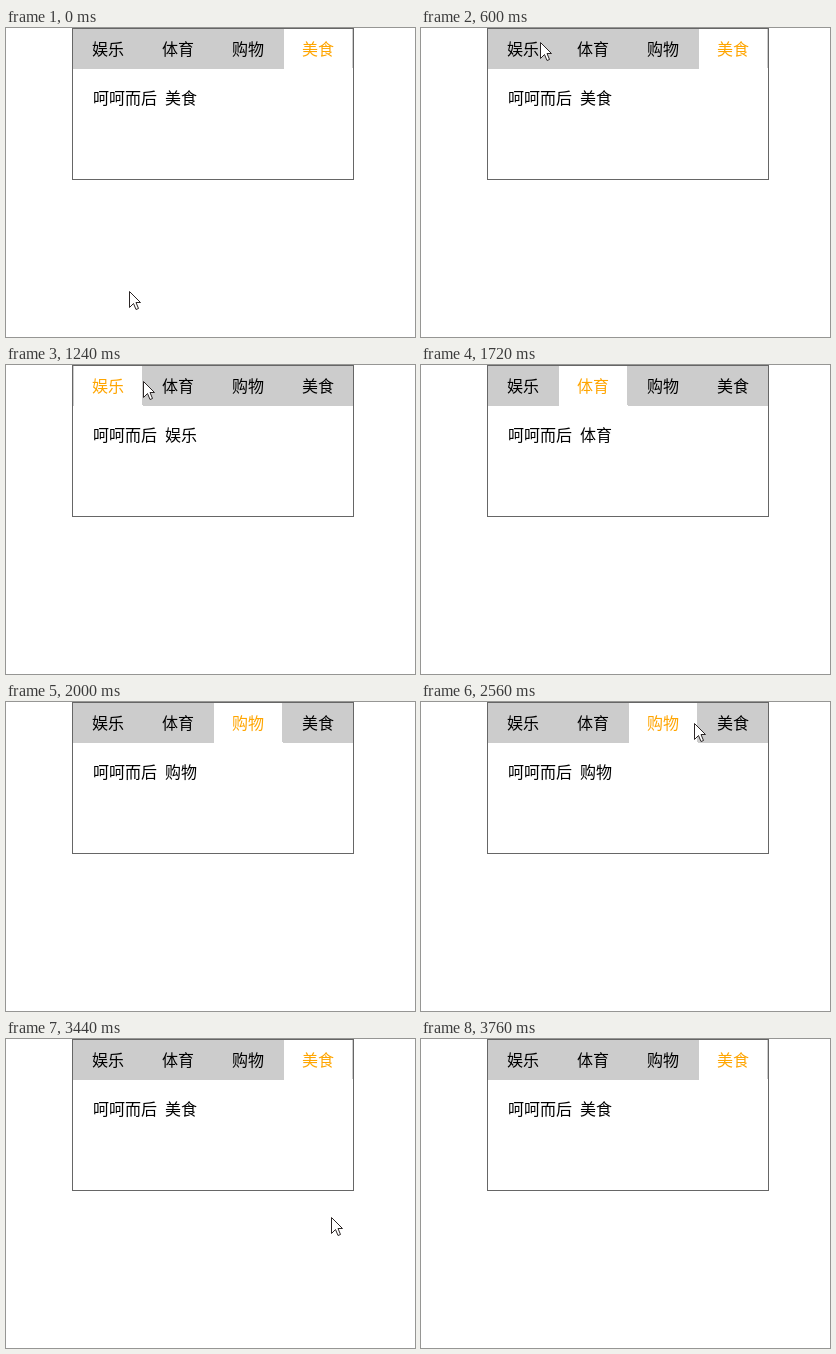
These frames come from a looping animation (409 px wide and 309 px high, 4720 ms). An HTML page with a canvas:

```html
<!DOCTYPE html>
<html lang="zh-CN">
<head>
<meta charset="utf-8">
<title>Tabs</title>
<style>
html, body { margin: 0; width: 100%; height: 100%; overflow: hidden; background: #fff; }
canvas { display: block; width: 100vw; height: 100vh; }
</style>
</head>
<body>
<canvas id="stage" width="409" height="309"></canvas>
<script>
const ctx = document.getElementById('stage').getContext('2d');
const LOOP = 4720, STEP = 40, EXIT = 3760;
const LABELS = ['娱乐', '体育', '购物', '美食'];
const FONT = '16px "Noto Sans CJK SC", "Noto Sans CJK", sans-serif';
const LEFT = 67, TAB = 70, BAR = 40, PAD = 19, LABEL_WIDTH = 32;

const START = { x: 123, y: 263 };
const MOVES = [
  { from: 360, to: 600, x: 119, y: 14 },
  { from: 600, to: 920, x: 98, y: 21 },
  { from: 1000, to: 1240, x: 137, y: 16 },
  { from: 1240, to: 1440, x: 172, y: 20 },
  { from: 1680, to: 2000, x: 240, y: 21 },
  { from: 2440, to: 2720, x: 318, y: 22 },
  { from: 3160, to: 3640, x: 330, y: 290 },
  { from: 3640, to: EXIT, x: 330, y: 309 }
];
const ARROW = new Path2D('M.5 .5V16.5L4.5 12.5L7 18.5L9.5 17.5L7 11.5H11.5Z');

function pointerAt(t) {
  let { x, y } = START;
  for (const m of MOVES) {
    const k = Math.min(1, Math.max(0, (t - m.from) / (m.to - m.from)));
    x += (m.x - x) * k;
    y += (m.y - y) * k;
  }
  return { x: Math.round(x), y: Math.round(y) };
}

// The tab hovered last; the page reacts one step after the pointer.
function activeTab(t) {
  for (let s = t - STEP; s >= 0; s -= STEP) {
    const { x, y } = pointerAt(s);
    if (y <= BAR) return Math.floor((x - LEFT) / TAB);
  }
  return LABELS.length - 1;
}

// The arrow gives way to an invisible text caret over a label.
function overLabel({ x, y }) {
  const dx = (x - LEFT) % TAB - PAD;
  return y > 11 && y < 30 && dx >= 0 && dx < LABEL_WIDTH;
}

function rect(color, x, y, w, h) {
  ctx.fillStyle = color;
  ctx.fillRect(x, y, w, h);
}

function text(str, x, y, color = '#000') {
  ctx.font = FONT;
  ctx.fillStyle = color;
  ctx.fillText(str, x, y);
}

function drawArrow({ x, y }) {
  ctx.save();
  ctx.translate(x, y);
  ctx.fillStyle = '#fff';
  ctx.fill(ARROW);
  ctx.strokeStyle = '#2b2626';
  ctx.stroke(ARROW);
  ctx.restore();
}

function drawTab(label, i, on) {
  const x = LEFT + i * TAB;
  if (on) {
    rect('#fff', x + 1, 1, TAB - 2, BAR);
    rect('#fff', x + TAB - 1, BAR, 1, 1);
  }
  text(label, x + PAD, 27, on ? '#ffa500' : '#000');
}

function draw(t) {
  const active = activeTab(t);
  rect('#fff', 0, 0, 409, 309);
  rect('#ccc', LEFT, 1, LABELS.length * TAB, BAR);
  LABELS.forEach((label, i) => drawTab(label, i, i === active));
  ctx.strokeStyle = '#666';
  ctx.strokeRect(66.5, 0.5, 281, 151);
  text('呵呵而后', 87, 76);
  text(LABELS[active], 159, 76);

  const pointer = pointerAt(t);
  if (t < EXIT && !overLabel(pointer)) drawArrow(pointer);
}

function tick() {
  const t = performance.now() % LOOP;
  draw(Math.floor(t / STEP) * STEP);
  requestAnimationFrame(tick);
}
tick();
</script>
</body>
</html>
```
